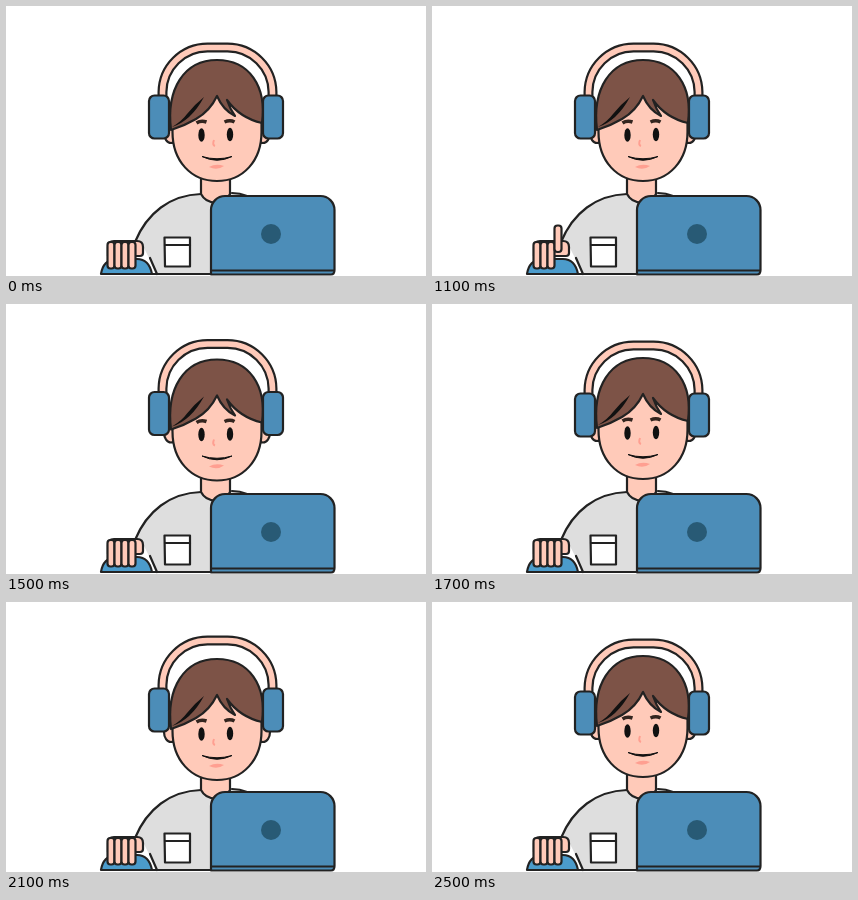
These frames come from a looping animation (420 by 270 pixels, 4.5 s). An HTML page:

```html
<!DOCTYPE html>
<html lang="en">
<head>
<meta charset="utf-8">
<title>Listening at the laptop</title>
<style>
  html, body { margin: 0; width: 100%; height: 100%; overflow: hidden; background: #fff; }
  svg { display: block; width: 420px; height: 270px; }
  .line { stroke: #222; stroke-width: 2.2; stroke-linecap: round; stroke-linejoin: round; }
  .open { fill: none; }
  .skin { fill: #ffcab9; }
  .blue { fill: #4c8db8; }
  .hair { fill: #7d5347; }
  .ink { fill: #111; }
</style>
</head>
<body>
<svg viewBox="0 0 420 270">
  <defs>
    <path id="band" fill="none" d="M156.5 92V86A45 45 0 0 1 201.5 41.5H221.5A45 45 0 0 1 266.5 86V92"/>
  </defs>

  <!-- Shirt and neck -->
  <path fill="#dedede" d="M129 236C141 207 164 189 195 188L226 187Q236 187 241 190V268H151L138 242Z"/>
  <path class="line open" d="M129 236C141 207 164 189 195 188M226 187Q234 187 241 190M144 252L151 268M146 268H206"/>
  <path class="skin line" d="M195 170V188Q199 196 210 197Q221 195 224 188V170Z"/>
  <path class="line" fill="#fff" d="M158.5 231.5H184V260.5H159Z"/>
  <path class="line open" d="M159 239H184"/>

  <g id="head">
    <ellipse class="skin line" cx="165" cy="127" rx="7" ry="10"/>
    <ellipse class="skin line" cx="257" cy="127" rx="7" ry="10"/>
    <path class="skin line" d="M166.5 102V126C166.5 155 185 175 211 175C237 175 255.5 155 255.5 126V102Q247 64 211 64Q176 64 166.5 102Z"/>
    <path class="hair line" d="M165 124C160 83 178 54 211 54C243 54 261 80 256 117Q234 112 221 94Q224 103 229 110Q217 104 211 90Q204 105 190 113Q178 120 165 124Z"/>
    <path class="ink" d="M198 91Q188 99 181 108Q176 115 166 121Q185 115 198 91Z"/>
    <path d="M190.5 117Q195 114 200.500 116M218.500 116Q224 113.500 228.500 116" fill="none" stroke="#33251f" stroke-width="3.5"/>
    <ellipse class="ink" cx="195.5" cy="129" rx="3.2" ry="6.7"/>
    <ellipse class="ink" cx="224" cy="128.5" rx="3.2" ry="6.7"/>
    <path d="M208 134Q206 139 209 140" fill="none" stroke="#ff9f91" stroke-width="2"/>
    <path class="ink" stroke="#111" d="M196 150.500Q211 155 226 150.500Q211 158 196 150.500Z"/>
    <path fill="#ff9f91" d="M203 161Q210 157 218 160Q211 165 203 161Z"/>
  </g>

  <g id="headphones">
    <use href="#band" stroke="#222" stroke-width="10"/>
    <use href="#band" stroke="#ffcab9" stroke-width="5.6"/>
    <rect class="blue line" x="143" y="89.5" width="20" height="43" rx="5.5"/>
    <rect class="blue line" x="257" y="89.5" width="20" height="43" rx="5.5"/>
  </g>

  <!-- Laptop -->
  <path class="blue line" d="M205 268.500V204A14 14 0 0 1 219 190H314.500A14 14 0 0 1 328.500 204V264Q328.500 268.500 325 268.500Z"/>
  <path class="line open" d="M206 264.500H328"/>
  <circle cx="265" cy="228" r="10" fill="#285a75"/>

  <g id="hand">
    <path class="line" fill="#4b9bcb" d="M95 268Q97 254 110 253H131Q143 253 146 268Z"/>
    <path class="skin line" d="M102 250V241Q102 235 108 235H131Q137 235 137 241V247Q137 250 134 250Z"/>
    <g class="skin line">
      <rect x="101.5" y="236" width="7" height="26.5" rx="3"/>
      <rect x="108.5" y="236" width="7" height="26.5" rx="3"/>
      <rect x="115.5" y="236" width="7" height="26.5" rx="3"/>
      <rect id="finger" x="122.5" y="236" width="7" height="26.5" rx="3"/>
    </g>
  </g>
</svg>
<script>
  const LOOP = 4500, STEP = 100;
  const part = id => document.getElementById(id);
  const shift = (id, x, y) => part(id).setAttribute('transform', `translate(${x} ${y})`);

  const mouseShift = { 8: 8, 9: 10, 10: 4 };

  // Quick nods, held for one step at a time.
  function nod(time) {
    if (time < 1500 || time >= 2500) return 0;
    return 1.5 * (1 - Math.cos(2 * Math.PI * (time - 1700) * 3 / 800));
  }

  function draw(time) {
    const step = Math.floor(time % LOOP / STEP);
    const offset = nod(step * STEP);
    const raised = step === 11 || step === 13;

    shift('hand', mouseShift[step] || 0, 0);
    shift('head', 0, offset);
    shift('headphones', 0, -offset);
    part('finger').setAttribute('y', raised ? 219.5 : 236);
  }

  const start = performance.now();
  function frame() {
    draw(performance.now() - start);
    requestAnimationFrame(frame);
  }
  frame();
</script>
</body>
</html>
```
